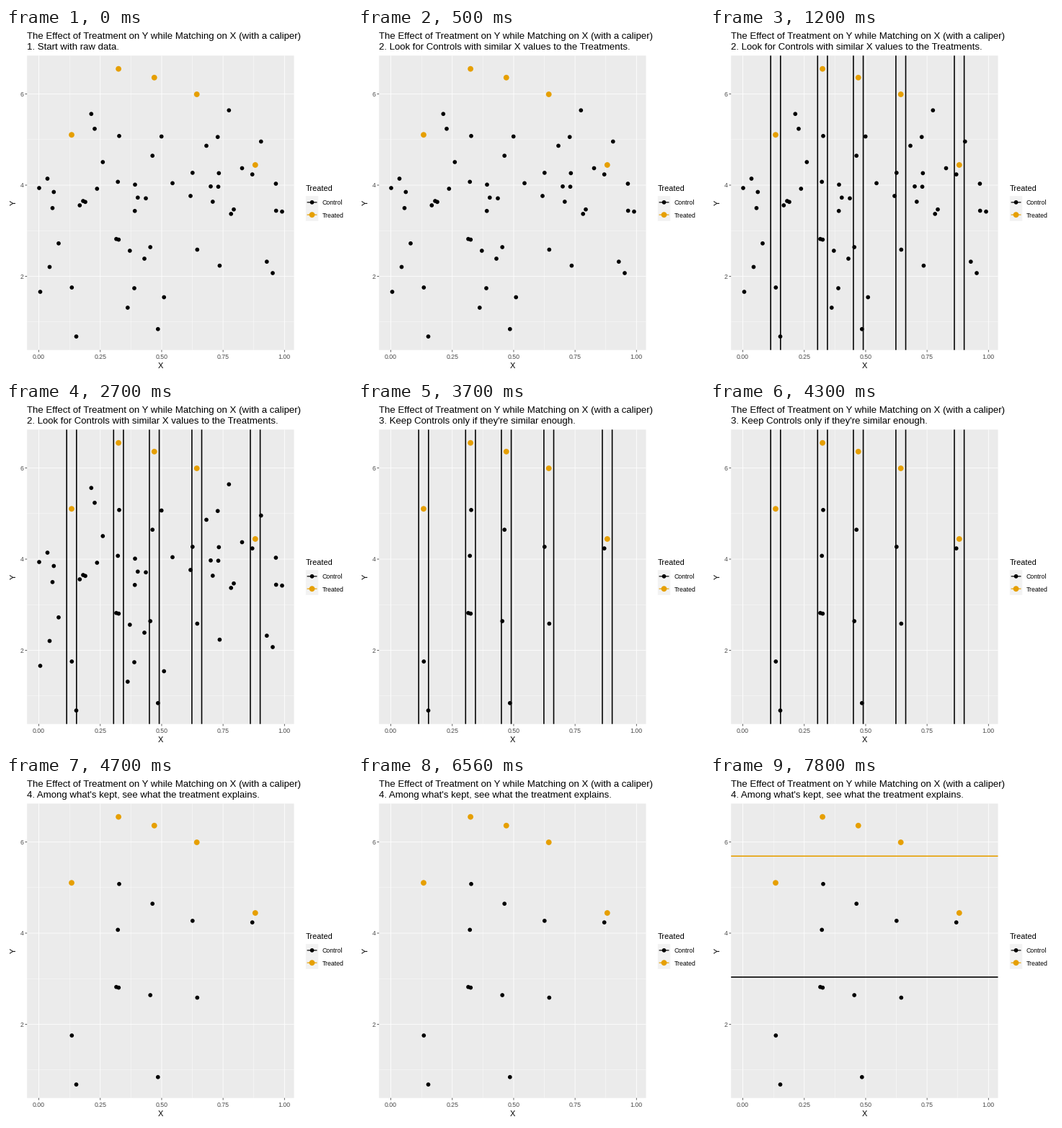
Animation of 480 by 480 pixels, one loop 8 s. Source, as a matplotlib script:

```python
import numpy as np
import matplotlib.pyplot as plt
from matplotlib.animation import FuncAnimation
from matplotlib.collections import PatchCollection
from matplotlib.patches import Circle, Rectangle

SIZE, DPI = 480, 80
PT = 72 / DPI                     # points per pixel
STEP, LOOP = 100, 8000            # ms
ORANGE, PANEL, TICK = "#E69F00", "#EBEBEB", "#333333"
LEFT, RIGHT, TOP, BOTTOM = 29.2, 399.5, 38.3, 446.7
CALIPER = 0.02 * 341

TITLE = "The Effect of Treatment on Y while Matching on X (with a caliper)"
STEPS = [
    (0, "1. Start with raw data."),
    (500, "2. Look for Controls with similar X values to the Treatments."),
    (3700, "3. Keep Controls only if they're similar enough."),
    (4700, "4. Among what's kept, see what the treatment explains."),
]
CALIPER_ON, DROP, CALIPER_OFF, MEANS_ON = 1200, 3700, 4700, 7800

# Point positions in stage pixels
treated = [(91, 148.2), (156.1, 56.7), (205.75, 68.8), (264.7, 92), (345.8, 190)]
matched = [
    (91.3, 360), (97.5, 428), (157, 149.8), (155.2, 213.4), (153, 292.7),
    (156.3, 293.6), (203.2, 177.2), (200.2, 304), (210.8, 417.7),
    (258.8, 200.9), (265.3, 307.5), (341.7, 203.1),
]
unmatched = [
    (46, 222), (57.5, 209), (66.3, 227.5), (64.5, 249.8), (47.5, 366),
    (60.5, 331.5), (73, 298.8), (102.3, 246), (107, 240), (110, 241.3),
    (118.3, 119.2), (123, 139.8), (134.3, 186), (126.3, 223), (179, 217.3),
    (182.8, 235.3), (194, 236.3), (178.7, 253.8), (171.8, 309), (192, 320),
    (178, 361), (168.8, 388), (215.7, 150.5), (231, 215.3), (219.2, 373.5),
    (256, 233), (278, 163.4), (293.7, 151.2), (309.3, 114.2), (295.3, 201.4),
    (294.5, 220.2), (284, 219.8), (286.8, 241), (316, 251.7), (312.2, 257.9),
    (296.4, 329.7), (327.5, 194.5), (353.8, 157.5), (374.4, 216),
    (374.7, 253.5), (383, 254.7), (361.8, 324.2), (370, 340),
]

plt.rcParams["font.family"] = "Liberation Sans"
fig = plt.figure(figsize=(SIZE / DPI, SIZE / DPI), dpi=DPI, facecolor="white")
ax = fig.add_axes([0, 0, 1, 1])
ax.set_xlim(0, SIZE)
ax.set_ylim(SIZE, 0)
ax.axis("off")


def px(x):
    return 45.6 + 340.7 * x


def py(y):
    return 471 - 63.25 * y


def line(xs, ys, color, width, z):
    return ax.plot(xs, ys, color=color, lw=width * PT, zorder=z, snap=False,
                   solid_capstyle="butt")[0]


def vline(x, color, width, z=1):
    return line([x, x], [TOP, BOTTOM], color, width, z)


def hline(y, color, width, z=1):
    return line([LEFT, RIGHT], [y, y], color, width, z)


def box(x, y, w, h, color):
    ax.add_patch(Rectangle((x, y), w, h, fc=color, ec="none", snap=False, zorder=0))


def text(x, y, s, size, color="black", **kw):
    return ax.text(x, y, s, fontsize=size * PT, color=color, va="baseline", **kw)


def dots(points, color, radius):
    group = PatchCollection([Circle(p, radius) for p in points],
                            facecolor=color, edgecolor="none", zorder=4)
    return ax.add_collection(group)


def draw_panel():
    box(LEFT, TOP, RIGHT - LEFT, BOTTOM - TOP, PANEL)
    for x in np.arange(0.125, 1, 0.25):
        vline(px(x), "white", 0.4)
    for y in (1, 3, 5):
        hline(py(y), "white", 0.4)
    for x in np.arange(0, 1.01, 0.25):
        vline(px(x), "white", 0.8)
        line([px(x)] * 2, [BOTTOM, BOTTOM + 2.75], TICK, 0.8, 2)
        text(px(x), 459, f"{x:.2f}", 8.8, "#4D4D4D", ha="center")
    for y in (2, 4, 6):
        hline(py(y), "white", 0.8)
        line([LEFT - 2.75, LEFT], [py(y)] * 2, TICK, 0.8, 2)
        text(24.2, round(py(y) + 3.4), str(y), 8.8, "#4D4D4D", ha="right")
    text(214.4, 472, "X", 11, ha="center")
    text(13.4, 242.5, "Y", 11, ha="center", rotation=90, rotation_mode="anchor")


def draw_legend():
    key, x, y = 17.28, 415.9, 233.2
    text(x, 226, "Treated", 11)
    for name, color, radius in (("Control", "black", 2.85), ("Treated", ORANGE, 3.9)):
        box(x, y, key, key, "#F2F2F2")
        mid = y + key / 2
        line([x + 0.1 * key, x + 0.9 * key], [mid, mid], color, 1.2, 3)
        dots([(x + key / 2, mid)], color, radius)
        text(438.7, round(mid + 3.6), name, 8.8)
        y += key


draw_panel()
draw_legend()
text(29, 15, TITLE, 13.2)
subtitle = text(29, 30, "", 13.2)
dots(matched, "black", 2.85)
dots(treated, ORANGE, 3.9)
extra = dots(unmatched, "black", 2.85)
calipers = [vline(x + d, "black", 1.6, 5)
            for x, _ in treated for d in (-CALIPER, CALIPER)]
means = [hline(np.mean([y for _, y in group]), color, 1.6, 5)
         for group, color in ((matched, "black"), (treated, ORANGE))]


def draw(i):
    t = i * STEP
    subtitle.set_text([s for start, s in STEPS if start <= t][-1])
    extra.set_visible(t < DROP)
    for c in calipers:
        c.set_visible(CALIPER_ON <= t < CALIPER_OFF)
    for m in means:
        m.set_visible(t >= MEANS_ON)
    return [subtitle, extra, *calipers, *means]


anim = FuncAnimation(fig, draw, frames=LOOP // STEP, interval=STEP,
                     init_func=lambda: draw(0), repeat=True, repeat_delay=0)
plt.show()
```
